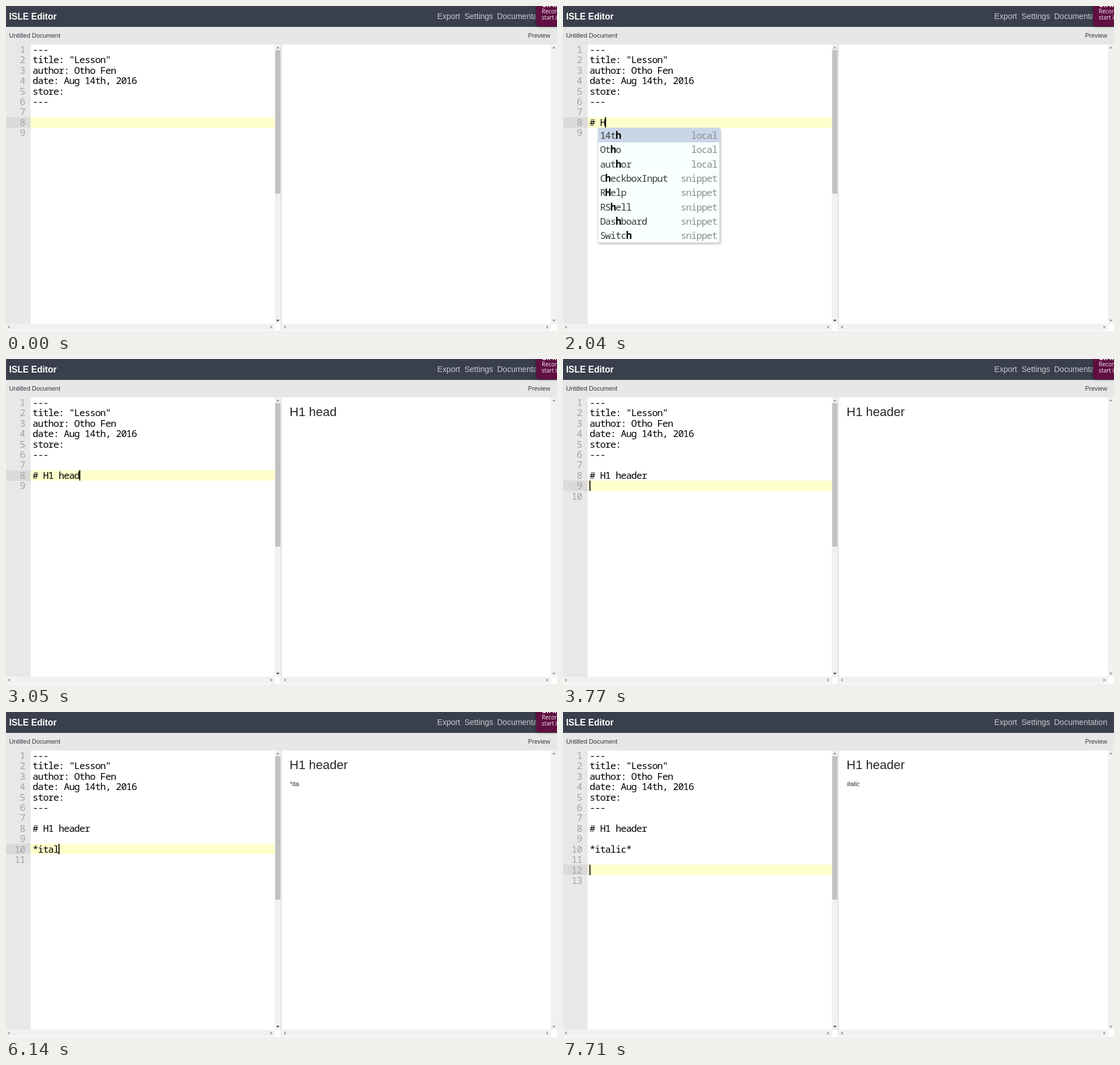
Write an HTML page with a canvas that moves like this. It is 974 px wide and 575 px high and loops after 8 s.

```html
<!DOCTYPE html>
<html lang="en">
<head>
<meta charset="utf-8">
<title>ISLE Editor</title>
<style>
html, body { margin: 0; width: 100%; height: 100%; overflow: hidden; background: #fff; }
canvas { display: block; }
</style>
</head>
<body>
<canvas id="stage" width="974" height="575"></canvas>
<script>
const ctx = document.getElementById('stage').getContext('2d');
const LOOP = 8000, ROW = 18.42, CHAR = 9.2, TEXT_X = 47, TOP = 67.6, POPUP_ROW = 25.3;
const MONO = '17px "Noto Sans Mono", monospace';
const SANS = '"Liberation Sans", Arial, sans-serif';

const header = ['---', 'title: "Lesson"', 'author: Otho Fen', 'date: Aug 14th, 2016', 'store:', '---', ''];
const keys = [
  [1310, '#'], [1570, ' '], [2040, 'H'], [2190, '1'], [2320, ' '],
  [2470, 'h'], [2610, 'e'], [2720, 'a'], [2900, 'd'], [3070, 'e'], [3160, 'r'],
  [3730, '\n'], [3930, '\n'], [5320, '*'],
  [5710, 'i'], [5850, 't'], [5990, 'a'], [6130, 'l'], [6290, 'i'], [6440, 'c'], [6620, '*'],
  [7400, '\n'], [7710, '\n']
];
const headingTimes = [2120, 2250, 2250, 2540, 2680, 2810, 2990, 3160, 3280];
const italicTimes = [5780, 5780, 5920, 6060, 6210, 6370, 6510];
const gutterTimes = [3770, 3930, 7510, 7710];
const cursorOff = [[0, 350], [950, 1310], [4520, 4920]];

const locals = ['14th', 'Otho', 'author', 'title'];
const snippets = ['CheckboxInput', 'RHelp', 'RShell', 'Dashboard', 'Switch',
  'SliderInput', 'VideoPlayer', 'TextInput', 'NumberInput', 'SelectInput'];

const passed = (times, t) => times.filter(time => time <= t).length;

function rect(x, y, w, h, color) {
  ctx.fillStyle = color;
  ctx.fillRect(x, y, w, h);
}

function text(string, x, y, font, color, align = 'left') {
  ctx.font = font;
  ctx.fillStyle = color;
  ctx.textAlign = align;
  ctx.fillText(string, x, y);
}

function code(string, x, y, color, bold) {
  ctx.letterSpacing = '-1px';
  text(string, x, y, (bold ? 'bold ' : '') + MONO, color);
  ctx.letterSpacing = '0px';
}

function arrow(x, y, dx, dy, color = '#9c9c9c') {
  ctx.fillStyle = color;
  ctx.beginPath();
  ctx.moveTo(x + dx * 2, y + dy * 2);
  ctx.lineTo(x - dx * 1.5 + dy * 3, y - dy * 1.5 + dx * 3);
  ctx.lineTo(x - dx * 1.5 - dy * 3, y - dy * 1.5 - dx * 3);
  ctx.fill();
}

// Positions of the query's letters, in order, or null when one is missing.
function fuzzyMatch(word, query) {
  const hits = [];
  let from = 0;
  for (const letter of query.toLowerCase()) {
    const at = word.toLowerCase().indexOf(letter, from);
    if (at < 0) return null;
    hits.push(at);
    from = at + 1;
  }
  return hits;
}

function drawFrame() {
  rect(0, 0, 974, 575, '#fff');
  rect(0, 0, 974, 37, '#393f4c');
  rect(0, 37, 974, 31, '#e7e7e7');
  text('ISLE Editor', 5.5, 24, 'bold 15.6px ' + SANS, '#fff');
  text('Export', 762.3, 23, '14px ' + SANS, '#c9cbcf');
  text('Settings', 810.5, 23, '14px ' + SANS, '#c9cbcf');
  text('Documentation', 868, 23, '14px ' + SANS, '#c9cbcf');
  text('Untitled Document', 5.5, 56, '11px ' + SANS, '#2f3440');
  text('Preview', 922.7, 56, '11px ' + SANS, '#2f3440');

  rect(0, 68, 43.5, 494, '#e8e8e8');
  rect(475, 68, 11, 494, '#f1f1f1');
  rect(476, 78, 9, 254, '#c1c1c1');
  rect(963, 68, 11, 494, '#f1f1f1');
  rect(0, 562, 475, 12, '#f1f1f1');
  rect(488, 562, 475, 12, '#f1f1f1');
  rect(486, 68, 1, 506, '#cfcfcf');
  for (const x of [480.5, 968.5]) {
    arrow(x, 73.5, 0, -1);
    arrow(x, 556.5, 0, 1, x < 500 ? '#505050' : '#9c9c9c');
  }
  for (const x of [5, 493]) {
    arrow(x, 568, -1, 0);
    arrow(x + 464, 568, 1, 0);
  }
}

function drawEditor(t, lines) {
  const active = lines.length - 1;
  const rowTop = TOP + active * ROW;
  rect(0, Math.round(rowTop), 43.5, 18.5, '#dadada');
  rect(43.5, Math.round(rowTop), 431.5, 18.5, '#ffffcc');
  const count = 9 + passed(gutterTimes, t);
  for (let i = 0; i < count; i++) {
    const number = String(i + 1);
    code(number, 33.5 - number.length * CHAR, TOP + i * ROW + 15.3, '#a3a3a3');
  }
  lines.forEach((line, i) => code(line, TEXT_X, TOP + i * ROW + 15.3, '#000'));
  if (!cursorOff.some(([from, to]) => t >= from && t < to))
    rect(TEXT_X + lines[active].length * CHAR - 0.3, rowTop, 1.8, ROW, '#000');
}

function drawPopup(lines) {
  const line = lines[lines.length - 1];
  const [query] = line.match(/[a-z]\w*$/i) || [];
  if (!query) return;
  const rows = [...locals, ...snippets]
    .map(word => ({ word, hits: fuzzyMatch(word, query) }))
    .filter(row => row.hits)
    .slice(0, 8);
  if (!rows.length) return;

  const textX = TEXT_X + (line.length - query.length) * CHAR;
  const x = Math.round(textX - 3.6), y = Math.round(TOP + lines.length * ROW + 1);
  ctx.save();
  ctx.shadowColor = 'rgba(0,0,0,.25)';
  ctx.shadowBlur = 4;
  ctx.shadowOffsetX = 1.5;
  ctx.shadowOffsetY = 2;
  rect(x - 0.5, y - 0.5, 216, rows.length * POPUP_ROW + 1, '#d0d3d3');
  ctx.restore();
  rect(x + 0.5, y, 214, rows.length * POPUP_ROW, '#f8ffff');
  rect(x + 0.5, y, 214, POPUP_ROW, '#c9d6e7');
  rows.forEach(({ word, hits }, i) => {
    const baseline = y + i * POPUP_ROW + 19;
    [...word].forEach((letter, j) => {
      const hit = hits.includes(j);
      code(letter, textX + j * CHAR, baseline, hit ? '#000' : '#3c3c3c', hit);
    });
    const kind = locals.includes(word) ? 'local' : 'snippet';
    code(kind, x + 210.5 - kind.length * CHAR, baseline, '#8b8f90');
  });
}

function drawPreview(t) {
  text('H1 header'.slice(0, passed(headingTimes, t)), 501.3, 101, '22px ' + SANS, '#24272c');
  const letters = passed(italicTimes, t);
  if (t >= 6930) {
    text('italic', 502, 131, 'italic 11px ' + SANS, '#24272c');
  } else if (letters) {
    text('*italic'.slice(0, letters), 502, 131, '11px ' + SANS, '#24272c');
  } else if (t >= 5470) {
    ctx.fillStyle = '#24272c';
    ctx.beginPath();
    ctx.arc(523, 128.3, 1.6, 0, 7);
    ctx.fill();
  }
}

function drawNotice(t) {
  const opacity = Math.min(1, (6770 - t) / 440);
  if (opacity <= 0) return;
  ctx.save();
  ctx.globalAlpha = opacity;
  ctx.shadowColor = 'rgba(0,0,0,.5)';
  ctx.shadowBlur = 4;
  ctx.fillStyle = '#5f0f40';
  ctx.beginPath();
  ctx.roundRect(937, -20, 60, 56, 5);
  ctx.fill();
  ctx.shadowColor = 'transparent';
  const font = '10px "Noto Sans", sans-serif';
  text('On R', 947, 2, 'bold 11px "Noto Sans", sans-serif', '#fff');
  text('Recor', 947, 13, font, '#f0e6ec');
  text('start i', 947, 24, font, '#f0e6ec');
  ctx.restore();
}

function draw(now) {
  const t = now % LOOP;
  const typed = keys.filter(([time]) => time <= t).map(([, key]) => key).join('');
  const lines = [...header, ...typed.split('\n')];
  drawFrame();
  drawEditor(t, lines);
  drawPreview(t);
  drawPopup(lines);
  drawNotice(t);
  requestAnimationFrame(draw);
}
requestAnimationFrame(draw);
</script>
</body>
</html>
```
